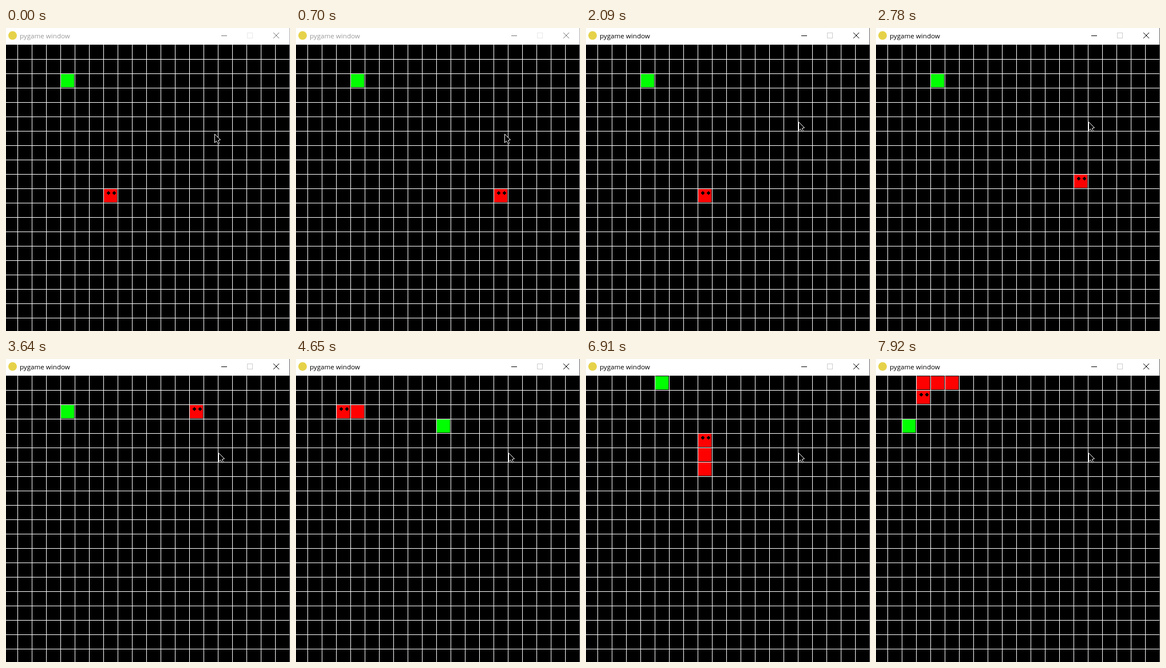
Write an HTML page with a canvas that moves like this. It is 496 px wide and 527 px high and loops after 8 s.

```html
<!DOCTYPE html>
<html lang="en">
<head>
<meta charset="utf-8">
<title>pygame window</title>
<style>
  html, body { margin: 0; width: 100%; height: 100%; overflow: hidden; background: #000; }
  canvas { display: block; }
</style>
</head>
<body>
<canvas width="496" height="527"></canvas>
<script>
const ctx = document.querySelector('canvas').getContext('2d');
const LOOP = 8000, CELL = 25, CELLS = 20, LEFT = -5, TOP = 29;
const STEP = 80, FOCUS_TIME = 1940;

// Bursts of moves: time of the first move, time of the last move, directions.
const bursts = [
  [150, 390, 'RRRR'], [540, 700, 'RRR'], [850, 1000, 'RRR'], [1170, 1320, 'RRR'],
  [1470, 1710, 'RRRR'], [1860, 2090, 'RRRR'], [2240, 2400, 'RRR'], [2550, 2780, 'RRRU'],
  [2950, 3100, 'UUU'], [3250, 3480, 'UUUU'], [3640, 3790, 'LLL'], [3960, 4100, 'LLL'],
  [4250, 4480, 'LLLL'], [4650, 4800, 'LLD'], [4950, 5110, 'DDR'], [5260, 5490, 'RRUU'],
  [5660, 5810, 'RRR'], [5960, 6190, 'RRRD'], [6360, 6590, 'DDLL'], [6740, 6910, 'LUU'],
  [7060, 7230, 'UUU'], [7380, 7610, 'ULLL'], [7760, 7920, 'LLD']
];
const directions = { R: [1, 0], L: [-1, 0], U: [0, -1], D: [0, 1] };
const snacks = [[4, 2], [10, 3], [5, 0], [2, 3]];

const moves = bursts.flatMap(([start, end, path]) =>
  [...path].map((key, i) => ({
    time: i === path.length - 1 ? end : start + i * STEP,
    direction: directions[key]
  })));

function gameAt(time) {
  const trail = [[7, 10]];
  let eaten = 0;
  for (const { time: moveTime, direction: [dx, dy] } of moves) {
    if (moveTime > time) break;
    const [col, row] = trail[0];
    const head = [(col + dx + CELLS) % CELLS, (row + dy + CELLS) % CELLS];
    trail.unshift(head);
    if (String(head) === String(snacks[eaten])) eaten++;
  }
  return { snake: trail.slice(0, eaten + 1), snack: snacks[eaten] };
}

function rect(color, x, y, width, height) {
  ctx.fillStyle = color;
  ctx.fillRect(x, y, width, height);
}

function drawCube([col, row], color) {
  rect(color, LEFT + col * CELL + 1, TOP + row * CELL + 1, CELL - 2, CELL - 2);
}

function drawEyes([col, row]) {
  const y = TOP + row * CELL + 8;
  for (const offset of [9, 19]) {
    const x = LEFT + col * CELL + offset;
    for (let r = 1; r <= 3; r++) rect('#000', x - r, y - 4 + r, 2 * r, 8 - 2 * r);
  }
}

function drawGrid() {
  for (let i = 1; i < CELLS; i++) {
    rect('#fff', LEFT + i * CELL, TOP, 1, 498);
    rect('#fff', 0, TOP + i * CELL, 495, 1);
  }
}

function drawTitleBar(active) {
  rect('#fff', 0, 0, 496, TOP);
  ctx.fillStyle = '#e6d24a';
  ctx.beginPath();
  ctx.arc(11.5, 13, 7.5, 0, 2 * Math.PI);
  ctx.fill();

  ctx.fillStyle = active ? '#000' : '#999';
  ctx.font = '11.6px "Open Sans", "Noto Sans", sans-serif';
  ctx.fillText('pygame window', 24, 18);

  const ink = active ? '#000' : '#777';
  rect(ink, 376, 13, 10, 1);
  ctx.lineWidth = 1;
  ctx.strokeStyle = active ? '#ccc' : '#e8e8e8';
  ctx.strokeRect(421.5, 8.5, 9, 9);
  ctx.strokeStyle = ink;
  ctx.beginPath();
  ctx.moveTo(467, 8);
  ctx.lineTo(477, 18);
  ctx.moveTo(477, 8);
  ctx.lineTo(467, 18);
  ctx.stroke();
}

function drawCursor(x, y) {
  const outline = [[0, 0], [0, 15], [3, 12], [6, 17], [8, 16], [6, 11], [10, 10]];
  ctx.beginPath();
  for (const [dx, dy] of outline) ctx.lineTo(x + dx + 0.5, y + dy + 0.5);
  ctx.closePath();
  ctx.fillStyle = '#000';
  ctx.fill();
  ctx.strokeStyle = '#fff';
  ctx.stroke();
}

function draw(now) {
  const time = now % LOOP;
  const active = time >= FOCUS_TIME;
  const { snake, snack } = gameAt(time);

  rect('#000', 0, 0, 496, 527);
  snake.forEach(cell => drawCube(cell, '#f00'));
  drawEyes(snake[0]);
  drawCube(snack, '#0f0');
  drawGrid();
  drawTitleBar(active);
  rect(active ? '#666' : '#b0b0b0', 495, 0, 1, 527);
  if (active) drawCursor(371, 163);
  else drawCursor(364, 184);
}

let startTime;
function tick(now) {
  startTime ??= now;
  draw(now - startTime);
  requestAnimationFrame(tick);
}
draw(0);
requestAnimationFrame(tick);
</script>
</body>
</html>
```
